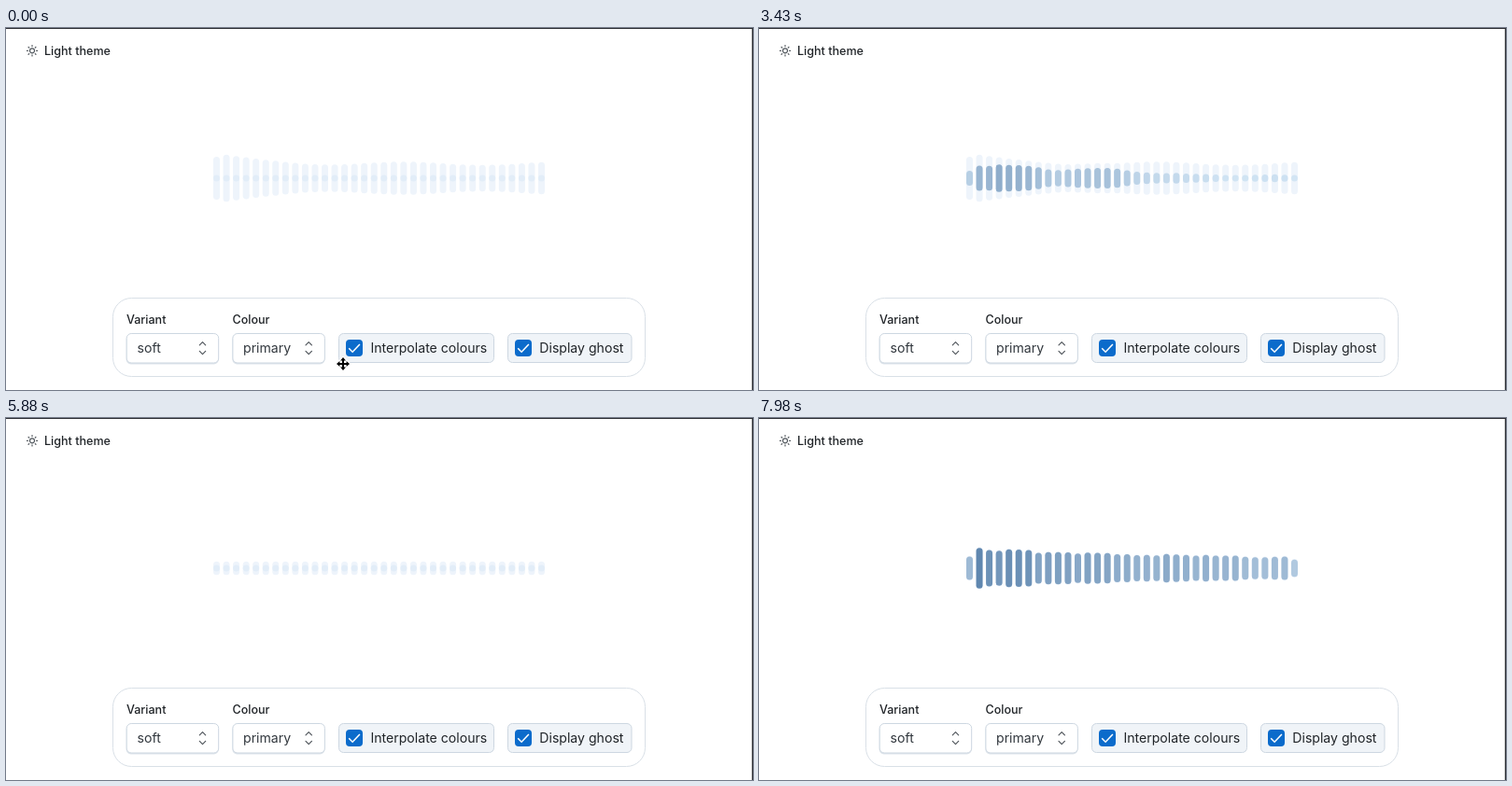
Recreate the animation shown at these times as an HTML page. Size 800 px wide and 388 px high, loop 8000 ms.

```html
<!DOCTYPE html>
<html lang="en">
<head>
<meta charset="utf-8">
<title>Audio visualiser</title>
<style>
  html, body { margin: 0; width: 100%; height: 100%; overflow: hidden; background: #fff; }
  svg { display: block; width: 800px; height: 388px; }
  text { font-family: Inter, sans-serif; font-size: 14.1px; fill: #202428; }
  .label { font-size: 12.55px; font-weight: 500; }
  .value { fill: #32383e; }
  .panel { fill: #fff; stroke: #d9e0e7; }
  .box { fill: #fff; stroke: #cdd7e1; }
  .check { fill: #f0f4f8; stroke: #cdd7e1; }
  .line { fill: none; stroke: #50565c; stroke-width: 1.2; stroke-linecap: round; stroke-linejoin: round; }
</style>
</head>
<body>
<svg viewBox="0 0 800 388">
  <defs>
    <g id="select">
      <rect x="0" y="1.4" width="99" height="32" rx="5" fill="#dfe5eb"/>
      <rect class="box" x=".5" y=".5" width="98.5" height="31.5" rx="5"/>
      <path class="line" d="M78.6 12.8 l3.2 -3.2 3.2 3.2 M78.6 19.4 l3.2 3.2 3.2 -3.2"/>
    </g>
    <g id="tick">
      <rect width="18" height="18" rx="4" fill="#0b6bcb"/>
      <path d="M3.2 9.3 l3.9 3.9 7.8 -8.2" fill="none" stroke="#fff" stroke-width="1.5"/>
    </g>
    <path id="arrows" d="M0 -7 L3 -3.6 H1 V-1 H3.6 V-3 L7 0 L3.6 3 V1 H1 V3.6 H3 L0 7 L-3 3.6 H-1 V1 H-3.6 V3 L-7 0 L-3.6 -3 V-1 H-1 V-3.6 H-3 Z"/>
  </defs>

  <path d="M0 .5 H800 M799.4 0 V388" stroke="#2b2d33" stroke-width="1.2"/>

  <g transform="translate(28 24.3)" class="line">
    <circle r="2.5"/>
    <g id="rays"></g>
  </g>
  <text class="label" x="41" y="28.7">Light theme</text>

  <g id="ghosts" fill="#eef4fb"></g>
  <g id="bars"></g>

  <rect class="panel" x="114.5" y="289.5" width="570" height="84" rx="20"/>
  <text class="label" x="129" y="317.3">Variant</text>
  <text class="label" x="242.5" y="317.3">Colour</text>
  <use href="#select" x="128.7" y="327"/>
  <use href="#select" x="242.4" y="327"/>
  <text class="value" x="140.6" y="348">soft</text>
  <text class="value" x="254" y="348">primary</text>

  <rect class="check" x="356.5" y="327.5" width="166" height="31" rx="5"/>
  <rect class="check" x="537.5" y="327.5" width="132.5" height="31" rx="5"/>
  <use href="#tick" x="364" y="334"/>
  <use href="#tick" x="545" y="334"/>
  <text x="390.4" y="348">Interpolate colours</text>
  <text x="571.3" y="348">Display ghost</text>

  <g id="cursor" transform="translate(361 360)">
    <use href="#arrows" stroke="#fff" stroke-width="2.4" stroke-linejoin="round"/>
    <use href="#arrows"/>
  </g>
</svg>
<script>
const LOOP = 8000, STEP = 70, COUNT = 34, MIDDLE = 161, WIDTH = 7, PITCH = 10.545;

const lerp = (a, b, u) => a + (b - a) * u;
const clamp = u => Math.min(1, Math.max(0, u));
const random = seed => {
  const x = Math.sin(seed * 127.1 + 11.7) * 43758.5453;
  return x - Math.floor(x);
};

// Spectra: the height of bar i for each kind of sound.
const onset = (i, dip) => 1 - dip * Math.exp(-3 * i);
const silence = () => 0;
const voice = (lift, cutoff = COUNT + 4) => i =>
  (25 + lift - 0.42 * i + 9 * Math.exp(-i / 4)) * onset(i, 0.42) * clamp((cutoff - i) / 6);
const hiss = i => 8 + 14 * Math.sqrt(clamp((i - 12) / 20));
const peak = i =>
  (32 + 22 * Math.exp(-i / 3.5) + 3.5 * Math.cos((i - 19) * Math.PI / 8)) * onset(i, 0.17);

const SPEECH = [
  [0, silence], [140, silence], [770, voice(1)], [1540, voice(0)], [2800, voice(1)],
  [4130, voice(-2, 22)], [4970, voice(0)], [5740, silence], [6300, silence],
  [6720, hiss], [7980, voice(12)]
];

function segment(keys, x) {
  let k = 1;
  while (k < keys.length - 1 && keys[k][0] < x) k++;
  const [a, from] = keys[k - 1], [b, to] = keys[k];
  return { k, from, to, u: clamp((x - a) / (b - a)) };
}

function level(i, t) {
  const { k, from, to, u } = segment(SPEECH, t);
  const grain = key => 0.93 + 0.14 * random(i + COUNT * key);
  const flutter = 1 + 0.16 * Math.sin(Math.PI * u) * Math.sin(t / 95 + i * 0.7);
  return lerp(from(i) * grain(k - 1), to(i) * grain(k), u) * flutter;
}

function ghostHeight(i, t, h) {
  const held = peak(i) * clamp((5900 - t) / 860);
  const calm = clamp((t - 6720) / 1260);
  return Math.max(held, h * lerp(1.2, 1, calm) + lerp(6, 1.5, calm));
}

const SHADES = [
  [0, [226, 237, 248]], [7, [207, 227, 243]], [24, [162, 189, 215]], [43, [96, 135, 175]]
];
function shade(h) {
  const { from, to, u } = segment(SHADES, h);
  return `rgb(${from.map((c, n) => Math.round(lerp(c, to[n], u)))})`;
}

const NS = "http://www.w3.org/2000/svg";
const $ = id => document.getElementById(id);

function add(parent, tag, attrs) {
  const node = document.createElementNS(NS, tag);
  for (const name in attrs) node.setAttribute(name, attrs[name]);
  return parent.appendChild(node);
}

function row(id) {
  return Array.from({ length: COUNT }, (_, i) =>
    add($(id), "rect", { x: 222 + i * PITCH, width: WIDTH, rx: WIDTH / 2 }));
}

function setHeight(rect, h) {
  rect.setAttribute("y", MIDDLE - h / 2);
  rect.setAttribute("height", h);
}

for (let a = 0; a < 360; a += 45) add($("rays"), "path", { d: "M0 -4.6 V-5.6", transform: `rotate(${a})` });
const ghosts = row("ghosts"), bars = row("bars");

function draw(t) {
  for (let i = 0; i < COUNT; i++) {
    const value = level(i, t), h = Math.max(WIDTH, value);
    setHeight(bars[i], h);
    bars[i].setAttribute("fill", shade(value));
    setHeight(ghosts[i], ghostHeight(i, t, h));
  }
  $("cursor").style.display = t < 420 ? "" : "none";
}

const start = performance.now();
function tick() {
  const t = (performance.now() - start) % LOOP;
  draw(Math.floor(t / STEP) * STEP);
  requestAnimationFrame(tick);
}
draw(0);
requestAnimationFrame(tick);
</script>
</body>
</html>
```
